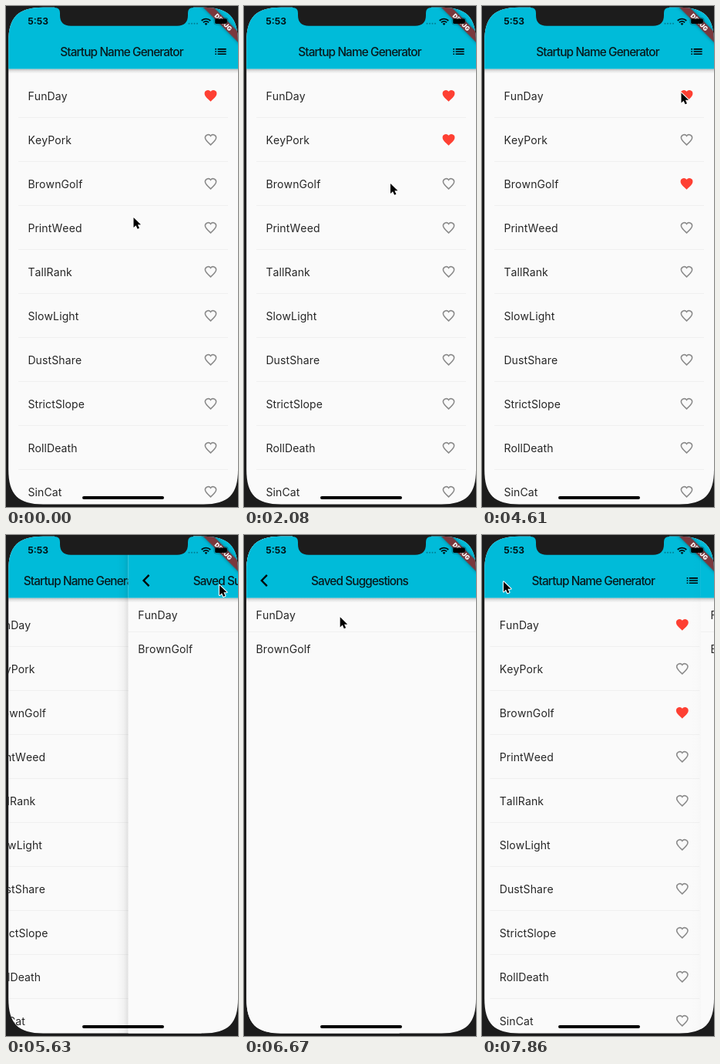
An HTML page for the animation above (8 s loop, 301 by 649 pixels).

```html
<!DOCTYPE html>
<html lang="en">
<head>
<meta charset="utf-8">
<title>Name list</title>
<style>
  html, body { margin: 0; width: 100%; height: 100%; overflow: hidden; background: #1c1c1c; }
  svg { display: block; width: 301px; height: 649px; }
  text { font-family: Inter, Roboto, sans-serif; white-space: pre; }
  .title { font-size: 15.3px; font-weight: 500; letter-spacing: -.85px; text-anchor: middle; fill: #08191c; }
  .name { font-size: 14px; letter-spacing: .12px; font-kerning: none; fill: #262626; }
  .clock { font-size: 12px; font-weight: 650; fill: #001316; }
  .debug { font-size: 8px; font-weight: 900; text-anchor: middle; fill: #fff; }
  .ribbon { fill: #7a383d; filter: drop-shadow(0 0 2px rgba(0, 0, 0, .4)); }
  .line { stroke: #000; stroke-opacity: .04; }
  .icon { fill: none; stroke: #000; }
  .heart { fill: none; stroke: #8b8b8b; stroke-width: 2.2; }
  .heart use { transform: translate(1.2px, 1.2px) scale(.9); }
  .liked { fill: #fe4033; stroke: none; }
  .liked use { transform: none; }
</style>
</head>
<body>
<svg viewBox="0 0 301 649">
  <defs>
    <clipPath id="glass"><path id="outline"/></clipPath>
    <linearGradient id="drop" x2="0" y2="1">
      <stop stop-opacity=".27"/>
      <stop offset=".4" stop-opacity=".1"/>
      <stop offset="1" stop-opacity="0"/>
    </linearGradient>
    <linearGradient id="edge">
      <stop stop-opacity="0"/>
      <stop offset=".6" stop-opacity=".07"/>
      <stop offset="1" stop-opacity=".22"/>
    </linearGradient>
    <path id="heart" d="M12 21.35C5.4 15.36 2 12.28 2 8.5A5.5 5.5 0 0 1 12 5.1 5.5 5.5 0 0 1 22 8.5C22 12.28 18.6 15.36 12 21.35z"/>
    <g id="sheet">
      <rect x="3" width="298" height="649" fill="#fafafa"/>
      <rect x="3" y="81.5" width="298" height="6" fill="url(#drop)"/>
      <rect x="3" width="298" height="81.5" fill="#00bbd9"/>
    </g>
  </defs>

  <g clip-path="url(#glass)">
    <g id="home">
      <use href="#sheet"/>
      <text class="title" x="150" y="64.5">Startup Name Generator</text>
      <path class="icon" transform="translate(269 49.5) scale(.792)" d="M3 8H21M3 12H21M3 16H21" stroke-width="2" stroke-dasharray="2 2 14"/>
      <g id="rows"></g>
    </g>
    <g id="saved">
      <rect id="shade" x="-12" width="15" height="649" fill="url(#edge)"/>
      <use href="#sheet"/>
      <text class="title" x="150" y="64.5">Saved Suggestions</text>
      <path class="icon" transform="translate(21.3 49.5) scale(.792)" d="M10.8 3L2 12l8.8 9" stroke-width="3"/>
      <text class="name" x="15.6" y="108.8">FunDay</text>
      <path class="line" d="M3 125.5h298"/>
      <text class="name" x="15.6" y="152.8">BrownGolf</text>
    </g>
    <g transform="translate(301 2) rotate(45)">
      <rect class="ribbon" x="-45" y="22.2" width="90" height="9.5"/>
      <text class="debug" y="29.8">DEBUG</text>
    </g>
  </g>

  <path d="M63 0V2Q70 2 70 9V12Q70 25.7 84 25.7H222Q236 25.7 236 12V9Q236 2 243 2V0z" fill="#1c1c1c"/>
  <text class="clock" x="28.2" y="24.3">5:53</text>
  <path d="M237.5 22.8h11" stroke="#000" stroke-opacity=".32" stroke-width="2" stroke-linecap="round" stroke-dasharray="0 3.5"/>
  <g fill="none" stroke="#001316" stroke-width="1.8">
    <path d="M253.7 19a8.3 8.3 0 0 1 11.6 0"/>
    <path d="M255.9 21.3a5.1 5.1 0 0 1 7.2 0"/>
  </g>
  <path d="M257.6 22.9a2.7 2.7 0 0 1 3.8 0l-1.9 2z" fill="#001316"/>
  <rect x="270" y="15.5" width="18" height="8.5" rx="2.4" fill="none" stroke="#000" stroke-opacity=".35" stroke-width=".8"/>
  <rect x="271.2" y="16.6" width="15.6" height="6.3" rx="1.3"/>
  <rect x="99" y="635" width="106" height="4" rx="2"/>

  <g id="cursor">
    <path transform="translate(.5 .9) scale(.9)" d="M0 0V14.6L3.4 11.4 5.7 16.6 8.3 15.5 6 10.4H10.6z" stroke="#fff" stroke-width="2.4" stroke-linejoin="round" paint-order="stroke"/>
  </g>
</svg>

<script>
const LOOP = 8000, WIDTH = 298, SLIDE = 400, ROW = 57;
const TICK = 148.16, FIRST = 592;   // the screen refreshes on this beat
const $ = id => document.getElementById(id);

// Screen outline: corners ease into the straight sides.
function outline(l, t, r, b, size, pull) {
  const s = size, k = size * pull, j = s - k;
  return `M${l} ${t + s}c0 ${-k} ${j} ${-s} ${s} ${-s}H${r - s}c${k} 0 ${s} ${j} ${s} ${s}` +
    `V${b - s}c0 ${k} ${-j} ${s} ${-s} ${s}H${l + s}c${-k} 0 ${-s} ${-j} ${-s} ${-s}z`;
}
$('outline').setAttribute('d', outline(3.2, 1.8, 301, 645.4, 45, .72));

const names = ['FunDay', 'KeyPork', 'BrownGolf', 'PrintWeed', 'TallRank',
  'SlowLight', 'DustShare', 'StrictSlope', 'RollDeath', 'SinCat'];

$('rows').innerHTML = names.map((name, i) => `
  <g transform="translate(0 ${i * ROW})">
    <text class="name" x="28.4" y="121.7">${name}</text>
    <g class="heart" transform="translate(256 106.8) scale(.792)"><use href="#heart"/></g>
    <path class="line" d="M16 144.5H288"/>
  </g>`).join('');
const hearts = document.querySelectorAll('.heart');

// Pointer gestures; bow bends the way there downwards.
const moves = [
  { from: 450, to: 1630, x: 190, y: 182 },
  { from: 1785, to: 2070, x: 189.5, y: 229 },
  { from: 2070, to: 2370, x: 191, y: 235 },
  { from: 3270, to: 3720, x: 212, y: 185 },
  { from: 3720, to: 4100, x: 252, y: 78 },
  { from: 4100, to: 4320, x: 258, y: 111.5 },
  { from: 4592, to: 5480, x: 276.5, y: 64 },
  { from: 6080, to: 7100, x: 27.5, y: 59.5, bow: 47 }
];

const progress = (t, from, to) => Math.min(1, Math.max(0, (t - from) / (to - from)));
const smooth = u => u * u * (3 - 2 * u);
const slide = (t, from) => 1 - (1 - progress(t, from, from + SLIDE)) ** 3.3;

function pointer(t) {
  let x = 165, y = 273;
  for (const m of moves) {
    const u = smooth(progress(t, m.from, m.to));
    x += (m.x - x) * u;
    y += (m.y - y) * u + (m.bow || 0) * Math.sin(Math.PI * u);
  }
  return [x, y];
}

const place = (id, x, y = 0) =>
  $(id).setAttribute('transform', `translate(${x.toFixed(2)} ${y.toFixed(2)})`);

function draw(t) {
  const open = slide(t, 5558) - slide(t, 7620);
  place('home', -open * WIDTH / 3);
  place('saved', (1 - open) * WIDTH);
  $('saved').style.display = open > 0 ? '' : 'none';
  $('shade').setAttribute('opacity', open);

  const liked = [true, t > 1600 && t < 3840, t > 2800];
  liked.forEach((on, i) => hearts[i].classList.toggle('liked', on));

  place('cursor', ...pointer(t));
}

let start;
function frame(now) {
  start ??= now;
  const t = (now - start) % LOOP;
  draw(FIRST + Math.floor((t - FIRST) / TICK) * TICK);
  requestAnimationFrame(frame);
}
draw(0);
requestAnimationFrame(frame);
</script>
</body>
</html>
```
